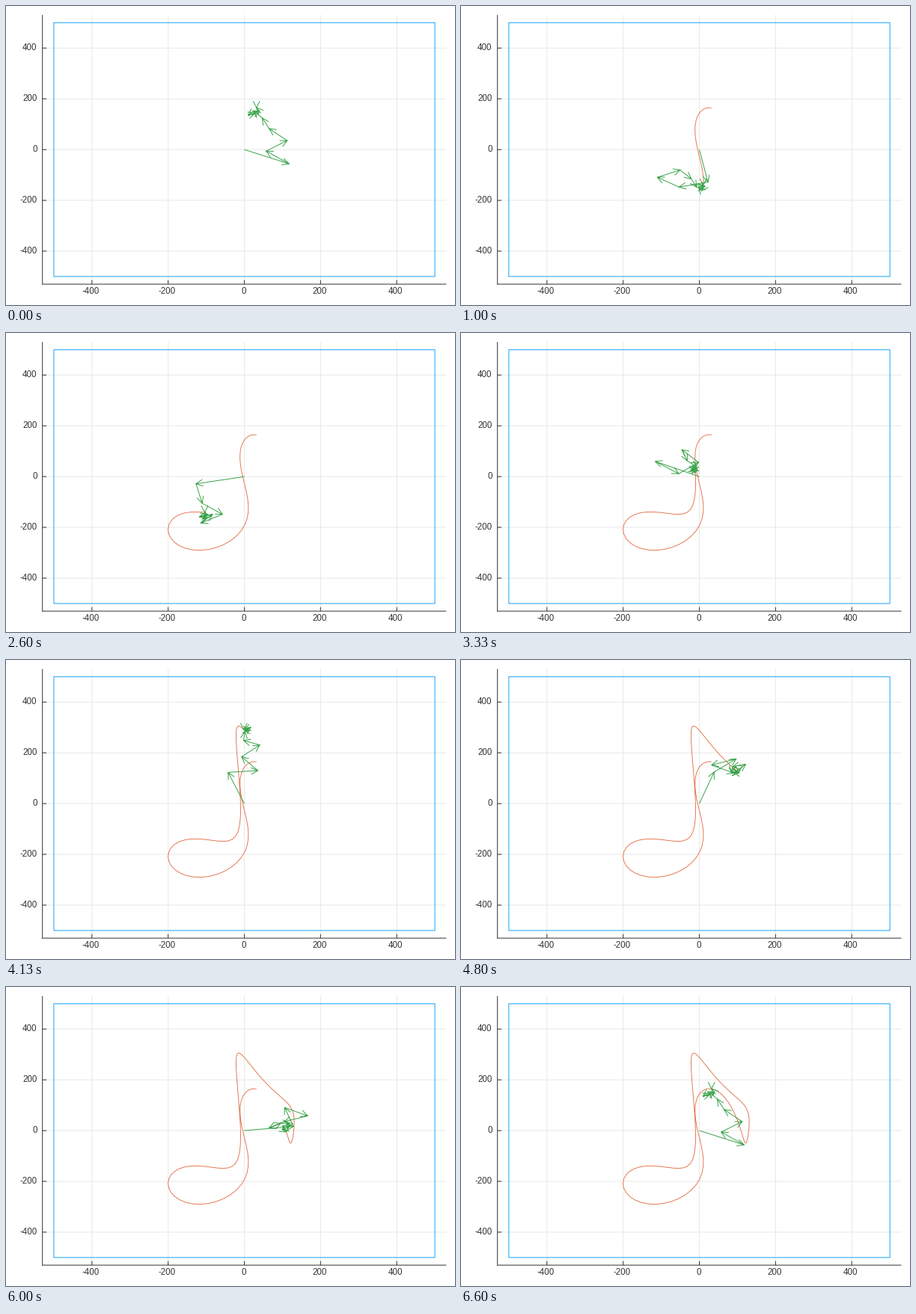
A matplotlib script that plays this animation: 600 px wide and 400 px high, repeating every 6.67 s.

```python
import numpy as np
import matplotlib.pyplot as plt
from matplotlib.animation import FuncAnimation

W, H, DPI = 600, 400, 100
LOOP, TICKS = 6670, 290  # 23 ms per tick
POSES, RATE = 100, 15  # poses, and poses per second
PX = 72 / DPI  # one pixel in points
BLUE, ORANGE, GREEN = "#009afa", "#e26f46", "#3da44d"
INK, GRID = "#333333", "#e8e8e8"

# Fourier terms (frequency, coefficient), longest first
TERMS = [
    (-1, 117.3 - 55.9j), (1, -59.8 + 50.1j),
    (2, 54.9 + 41.4j), (-2, -47.0 + 46.8j),
    (-3, -18.3 + 42.0j), (3, -22.3 + 27.6j),
    (-4, -14.9 - 17.0j), (4, 18.0 + 8.7j),
    (-5, 12.0 + 8.5j), (5, -8.0 + 12.5j),
    (0, 0j),
]
FREQ = np.array([f for f, _ in TERMS])
COEF = np.array([c for _, c in TERMS])


def sx(x):
    return 318.5 + 0.5092 * np.asarray(x)


def sy(y):
    return 192.1 - 0.3396 * np.asarray(y)


def joints(k):
    """Screen positions of the arrow chain, from the origin to the tip."""
    turn = np.exp(2j * np.pi * FREQ * k / (POSES - 1))
    z = np.concatenate([[0], np.cumsum(COEF * turn)])
    return np.column_stack([sx(z.real), sy(z.imag)])


def head(a, b):
    """Open arrowhead at b; a zero-length arrow points down."""
    d = b - a
    n = np.hypot(*d)
    d = d / n if n > 1e-6 else np.array([0.0, 1.0])
    side = np.array([-d[1], d[0]])
    back = b - 9 * d
    return [back + 4.5 * side, b, back - 4.5 * side]


fig = plt.figure(figsize=(W / DPI, H / DPI), dpi=DPI, facecolor="white")
ax = fig.add_axes([0, 0, 1, 1])
ax.set_xlim(0, W)
ax.set_ylim(H, 0)
ax.axis("off")


def line(xs, ys, color, width=1):
    return ax.plot(xs, ys, color=color, lw=width * PX, snap=False,
                   solid_capstyle="butt", solid_joinstyle="round")[0]


LEFT, RIGHT, TOP, BOTTOM = 48.7, 588.4, 12, 372.1
font = dict(family="Liberation Sans", size=8.3, color=INK)
for v in range(-400, 401, 200):
    x, y = sx(v), sy(v)
    line([x, x], [TOP, BOTTOM], GRID)
    line([LEFT, RIGHT], [y, y], GRID)
    line([x, x], [BOTTOM, BOTTOM - 5.4], INK)
    line([LEFT, LEFT + 5.4], [y, y], INK)
    ax.text(x - 1.2, 382.3, str(v), ha="center", va="center", **font)
    ax.text(41.6, y, str(v), ha="right", va="center", **font)
line([LEFT, LEFT], [TOP, BOTTOM + 0.5], INK)
line([LEFT - 0.5, RIGHT], [BOTTOM, BOTTOM], INK)

line(sx([-500, 500, 500, -500, -500]), sy([-500, -500, 500, 500, -500]),
     BLUE, 0.9)
trail = line([], [], ORANGE, 0.9)
arrows = line([], [], GREEN)

CHAINS = [joints(k) for k in range(POSES)]
TIPS = np.array([c[-1] for c in CHAINS])
GAP = [[np.nan, np.nan]]


def pose_at(tick):
    """Pose reached by the end of a tick; poses start on rounded 10 ms."""
    end = (tick + 1) * LOOP / TICKS - 1
    return min(int((end + 5) * RATE / 1000), POSES - 1)


def draw(tick):
    k = pose_at(tick)
    pts = CHAINS[k]
    parts = [pts]
    for a, b in zip(pts[:-1], pts[1:]):
        parts += [GAP, head(a, b)]
    arrows.set_data(*np.vstack(parts).T)
    trail.set_data(*TIPS[:k + 1].T)
    return trail, arrows


anim = FuncAnimation(fig, draw, frames=TICKS, interval=LOOP // TICKS,
                     repeat=True, repeat_delay=0, blit=False)
plt.show()
```
